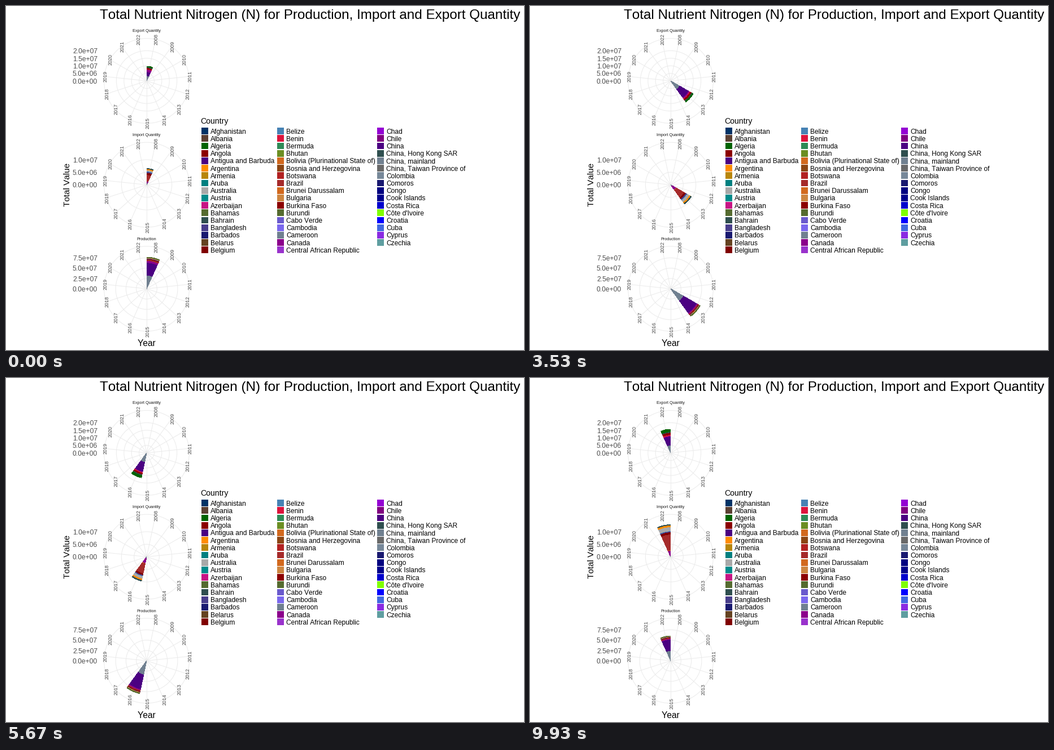
A matplotlib script that plays this animation: 917x611 px, repeating every 10 s.

```python
import numpy as np
import matplotlib.pyplot as plt
from matplotlib.animation import FuncAnimation
from matplotlib.patches import Circle, Rectangle, Wedge

W, H, DPI = 917, 611, 64
FRAMES, INTERVAL = 250, 40
YEARS = np.arange(2008, 2023)
STEP = 360 / len(YEARS)
CX, RIM = 249, 75.4
GRID, GREY = "#ebebeb", "#4d4d4d"
PT = 72 / DPI

plt.rcParams["font.family"] = "Liberation Sans"
plt.rcParams["text.kerning_factor"] = 10

KEY_YEARS = [2008, 2011, 2014, 2018, 2022]

# radius: bar length per year in pixels
# layers: colour and cumulative share of the bar at each key year
PANELS = [
    dict(
        name="Export Quantity", cy=133, tick=13.4,
        labels=["0.0e+00", "5.0e+06", "1.0e+07", "1.5e+07", "2.0e+07"],
        radius=[26, 26.3, 36, 31.5, 42, 46, 58, 67, 45, 43, 41.5, 48.5, 50.2, 52.5, 42],
        layers=[
            ("slategray", [.35, .35, .43, .34, .33]),
            ("indigo", [.62, .72, .85, .69, .70]),
            ("darkmagenta", [.78, .81, .87, .71, .725]),
            ("crimson", [.81, .85, .89, .75, .77]),
            ("darkred", [.90, .94, .94, .83, .86]),
            ("darkslategray", [.96, .97, .96, .87, .89]),
            ("darkgreen", [1, 1, 1, 1, 1]),
        ],
    ),
    dict(
        name="Import Quantity", cy=317.6, tick=22.3,
        labels=["0.0e+00", "5.0e+06", "1.0e+07"],
        radius=[29, 27, 34, 40, 39, 42, 44.3, 43, 43.8, 48, 53.3, 55, 60, 67, 57],
        layers=[
            ("slategray", [.10, .08, .06, .06, .04]),
            ("darkmagenta", [.22, .26, .28, .28, .20]),
            ("chocolate", [.23, .27, .29, .30, .22]),
            ("brown", [.62, .60, .70, .70, .70]),
            ("maroon", [.74, .70, .76, .77, .77]),
            ("darkslateblue", [.80, .78, .79, .81, .79]),
            ("steelblue", [.83, .81, .81, .825, .805]),
            ("darkgray", [.91, .91, .92, .91, .93]),
            ("darkorange", [.98, .97, .97, .975, .985]),
            ("darkslategray", [1, 1, 1, 1, 1]),
        ],
    ),
    dict(
        name="Production", cy=502.2, tick=18.3,
        labels=["0.0e+00", "2.5e+07", "5.0e+07", "7.5e+07"],
        radius=[56, 53.8, 58.9, 59, 61.3, 60.3, 64.3, 67, 59.5, 54.4, 50.5, 49, 47.5, 46, 44],
        layers=[
            ("slategray", [.43, .45, .44, .42, .41]),
            ("indigo", [.83, .89, .89, .86, .86]),
            ("darkmagenta", [.89, .92, .92, .895, .895]),
            ("brown", [.93, .945, .945, .93, .93]),
            ("maroon", [.95, .96, .96, .95, .95]),
            ("darkslateblue", [.965, .97, .97, .96, .965]),
            ("peru", [.985, .985, .985, .98, .985]),
            ("darkolivegreen", [1, 1, 1, 1, 1]),
        ],
    ),
]

LEGEND = [
    (345, [
        ("Afghanistan", "#003366"), ("Albania", "#5c4033"),
        ("Algeria", "darkgreen"), ("Angola", "darkred"),
        ("Antigua and Barbuda", "indigo"), ("Argentina", "darkorange"),
        ("Armenia", "darkgoldenrod"), ("Aruba", "teal"),
        ("Australia", "darkgray"), ("Austria", "darkcyan"),
        ("Azerbaijan", "mediumvioletred"), ("Bahamas", "darkolivegreen"),
        ("Bahrain", "darkslategray"), ("Bangladesh", "darkslateblue"),
        ("Barbados", "midnightblue"), ("Belarus", "#654321"),
        ("Belgium", "maroon"),
    ]),
    (479, [
        ("Belize", "steelblue"), ("Benin", "crimson"),
        ("Bermuda", "seagreen"), ("Bhutan", "olivedrab"),
        ("Bolivia (Plurinational State of)", "chocolate"),
        ("Bosnia and Herzegovina", "saddlebrown"),
        ("Botswana", "firebrick"), ("Brazil", "brown"),
        ("Brunei Darussalam", "chocolate"), ("Bulgaria", "peru"),
        ("Burkina Faso", "darkred"), ("Burundi", "darkolivegreen"),
        ("Cabo Verde", "slateblue"), ("Cambodia", "mediumslateblue"),
        ("Cameroon", "slategray"), ("Canada", "darkmagenta"),
        ("Central African Republic", "darkorchid"),
    ]),
    (656, [
        ("Chad", "darkviolet"), ("Chile", "purple"), ("China", "indigo"),
        ("China, Hong Kong SAR", "darkslategray"),
        ("China, mainland", "slategray"),
        ("China, Taiwan Province of", "dimgray"),
        ("Colombia", "lightslategray"), ("Comoros", "midnightblue"),
        ("Congo", "navy"), ("Cook Islands", "darkblue"),
        ("Costa Rica", "mediumblue"), ("Côte d'Ivoire", "chartreuse"),
        ("Croatia", "blue"), ("Cuba", "royalblue"),
        ("Cyprus", "blueviolet"), ("Czechia", "cadetblue"),
    ]),
]

fig = plt.figure(figsize=(W / DPI, H / DPI), dpi=DPI, facecolor="white")
ax = fig.add_axes([0, 0, 1, 1])
ax.set_xlim(0, W)
ax.set_ylim(H, 0)
ax.axis("off")


def label(x, y, text, px, color="black", ha="left", angle=0):
    """Text whose baseline passes through (x, y), sized in pixels."""
    ax.text(x, y, text, fontsize=px * PT, color=color, ha=ha, va="baseline",
            rotation=angle, rotation_mode="anchor")


def draw_grid(panel):
    cy, tick = panel["cy"], panel["tick"]
    label(CX, cy - 86.6, panel["name"], 7.3, "#1a1a1a", "center")
    rings = [tick * i for i in range(1, len(panel["labels"]))] + [RIM]
    for r in rings:
        ax.add_patch(Circle((CX, cy), r, fill=False, ec=GRID, lw=PT))
    for i, text in enumerate(panel["labels"]):
        label(162, cy - i * tick + 4.7, text, 12, GREY, "right")
    for i, year in enumerate(YEARS):
        a = np.radians((i + 0.5) * STEP)
        x, y = CX + RIM * np.sin(a), cy - RIM * np.cos(a)
        ax.plot([CX, x], [cy, y], color=GRID, lw=PT, zorder=1)
        label(x + 4.2, y, str(year), 9, GREY, "center", 90)


def make_bar(panel, i):
    """Stacked sector of one year, built from the centre outwards."""
    wedges, inner = [], 0
    start = i * STEP - 90
    for color, shares in panel["layers"]:
        outer = panel["radius"][i] * np.interp(YEARS[i], KEY_YEARS, shares)
        wedge = Wedge((CX, panel["cy"]), outer, start, start + STEP,
                      width=outer - inner, fc=color, lw=0,
                      antialiased=False, visible=False, zorder=2)
        wedges.append(ax.add_patch(wedge))
        inner = outer
    return wedges


label(165.5, 23.3, "Total Nutrient Nitrogen (N) for Production, "
      "Import and Export Quantity", 24.22)
label(CX, 604, "Year", 15.5, ha="center")
label(113.3, 317, "Total Value", 15.3, ha="center", angle=90)
label(344.5, 209.5, "Country", 14)

for x, entries in LEGEND:
    for row, (name, color) in enumerate(entries):
        y = 226.6 + 13.2 * row
        ax.add_patch(Rectangle((x + 0.8, y - 10.4), 11.8, 11.8, fc=color, lw=0))
        label(x + 17, y, name, 11.95)

for panel in PANELS:
    draw_grid(panel)

bars = [[w for p in PANELS for w in make_bar(p, i)] for i in range(len(YEARS))]

# years are spread over 150 ticks of 1/15 s, the last one on the final tick
ticks = np.floor(np.linspace(0, 149, len(YEARS)) + 0.5).astype(int)
starts = ticks * 1000 // (15 * INTERVAL)


def update(frame):
    current = np.searchsorted(starts, frame, side="right") - 1
    for i, wedges in enumerate(bars):
        for wedge in wedges:
            wedge.set_visible(i == current)
    return [w for wedges in bars for w in wedges]


anim = FuncAnimation(fig, update, frames=FRAMES, interval=INTERVAL,
                     init_func=lambda: update(0), repeat=True, repeat_delay=0)
plt.show()
```
